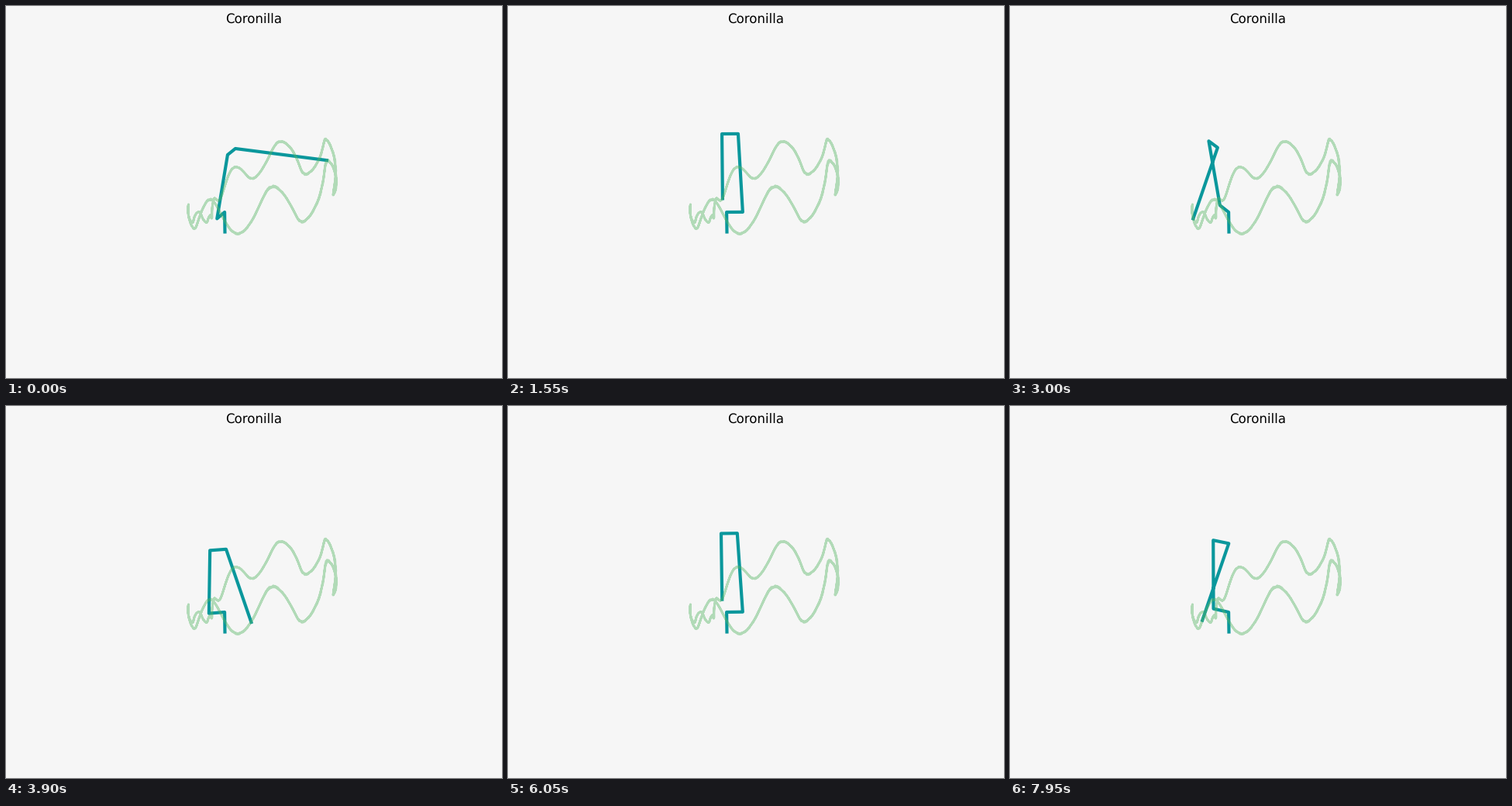
These frames come from a looping animation (640 by 480 pixels, 8000 ms). A matplotlib script:

```python
import numpy as np
import matplotlib.pyplot as plt
from matplotlib.animation import FuncAnimation

plt.rcParams["text.hinting"] = "none"

W, H, DPI = 640, 480, 100
FRAMES, INTERVAL = 160, 50
STEP = 0.07                        # base joint turn per frame, in radians

# Arm dimensions, in screen pixels along the x axis
BASE, OFFSET, LINK = 41.0, 22.2, 135.3
Y_SCALE, Z_SCALE = 0.87, 0.75      # box proportions of the 3D view

# Camera: azimuth -60, elevation 30, eye 2000 px away
CX, CY, EYE = 333.0, 237.4, 2000.0
COS30, SIN30 = np.cos(np.pi / 6), 0.5
ORIGIN = (-52.3, -56.0, 70.0)      # arm foot: right, up, away


def project(p):
    """Perspective projection of (..., 3) points to pixel coordinates."""
    p = np.asarray(p, float)
    x, y, z = p[..., 0], p[..., 1] * Y_SCALE, p[..., 2] * Z_SCALE
    right = COS30 * x + SIN30 * y
    depth = COS30 * y - SIN30 * x
    up = COS30 * z + SIN30 * depth
    away = COS30 * depth - SIN30 * z
    k = EYE / (EYE + ORIGIN[2] + away)
    return CX + (ORIGIN[0] + right) * k, CY - (ORIGIN[1] + up) * k


def crown(theta):
    """Radius and height of the hand for a given base angle."""
    size = 86.5 + 64 * np.cos(theta)
    z = (size * (0.79 + 0.235 * np.cos(10 * theta)) - 3.5) / Z_SCALE
    # the waves lie on a rounded band, widest halfway up
    r = size * (1 + 0.042 * np.sin(10 * theta) ** 2)
    return r, z


def arm(theta):
    """Joint positions, elbow up, with the hand on the crown."""
    r, z = crown(theta)
    z -= BASE
    bend = np.arccos(np.hypot(r, z) / (2 * LINK))
    lift = np.arctan2(z, r) + bend
    out = np.array([np.cos(theta), np.sin(theta), 0])
    side = OFFSET * np.array([np.sin(theta), -np.cos(theta), 0])
    top = np.array([0, 0, BASE])
    upper = LINK * (np.cos(lift) * out + np.array([0, 0, np.sin(lift)]))
    hand = r * out + top + np.array([0, 0, z])
    return np.array([[0, 0, 0], top, top + side, top + side + upper,
                     top + upper, hand])


fig = plt.figure(figsize=(W / DPI, H / DPI), dpi=DPI, facecolor="#f6f6f6")
fig.suptitle("Coronilla", fontsize=12)
ax = fig.add_axes([0, 0, 1, 1])
ax.set_xlim(0, W)
ax.set_ylim(H, 0)
ax.axis("off")

arm_line, = ax.plot([], [], color="#0a979c", lw=3)

# Several turns of the hand path, sampled at the frame step
turns = STEP * np.arange(270)
radius, height = crown(turns)
path = np.stack([radius * np.cos(turns), radius * np.sin(turns), height], -1)
ax.plot(*project(path), color="#57b765", alpha=0.43, lw=2)


def draw(i):
    arm_line.set_data(*project(arm(STEP * i)))
    return arm_line,


anim = FuncAnimation(fig, draw, frames=FRAMES, interval=INTERVAL,
                     repeat=True, repeat_delay=0)
plt.show()
```
